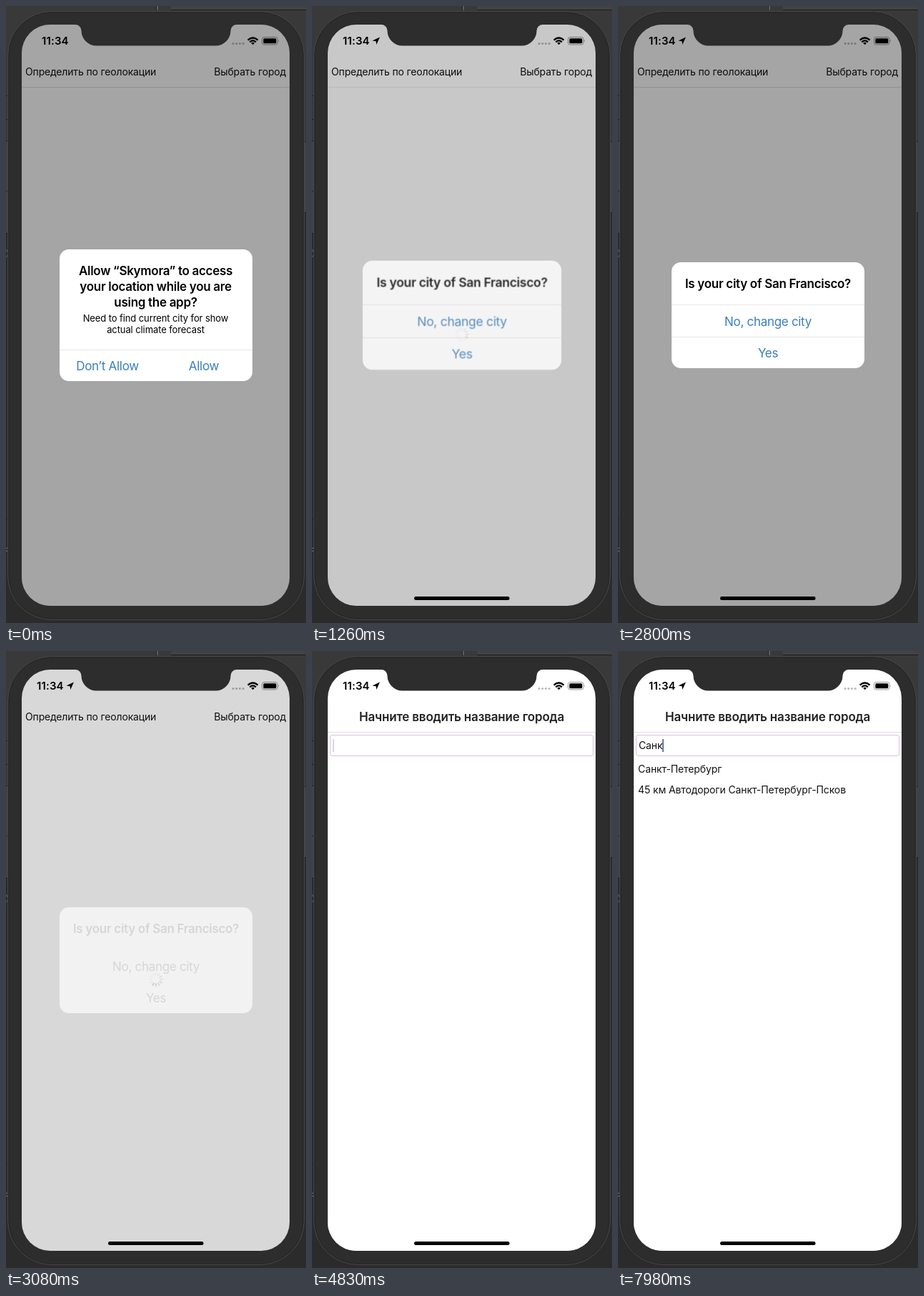
Write an HTML page that moves like this. It is 420 px wide and 862 px high and loops after 8000 ms.

```html
<!DOCTYPE html>
<html lang="ru">
<head>
<meta charset="utf-8">
<title>City picker</title>
<style>
html, body { margin: 0; width: 100%; height: 100%; overflow: hidden; background: #2b2b2b; }
body { position: relative; font: 14px/20px Inter, "Open Sans", sans-serif; letter-spacing: -.15px; color: #111; }
body *, body *::before { animation: 8s linear infinite; }
svg, .screen, .layer { position: absolute; left: 0; top: 0; width: 420px; height: 862px; }
.screen { clip-path: inset(26px 23px 24px 22px round 40px); background: #fff; }

p { position: absolute; margin: 0; white-space: nowrap; left: calc(var(--x) * 1px); top: calc(var(--y) * 1px - 10px); }
.mid { transform: translateX(-50%); }
.big { font-size: 17px; letter-spacing: -.3px; }
.bold { font-weight: 600; letter-spacing: -.3px; }
.line { position: absolute; height: 1px; }

/* navigation */
.nav { left: 22px; top: 113px; width: 375px; background: #e0e0e0; animation-name: nav; }
.menu { animation-name: menu; }
.heading { animation-name: heading; color: #222; letter-spacing: -.17px; }
.old { animation-name: old; }
.new { animation-name: new; }
.sheet { position: absolute; left: 22px; top: 114px; width: 375px; height: 724px; background: #fff; animation-name: edge; }
@keyframes nav { 0%, 3.5% { opacity: 1 } 7.5%, 13% { opacity: 0 } 17.5%, 35% { opacity: 1 } 38%, 44% { opacity: 0 } 47%, 100% { opacity: 1 } }
@keyframes menu { 0%, 45% { opacity: 1 } 48.125% { opacity: .62 } 52%, 100% { opacity: 0 } }
@keyframes heading { 0%, 46.5% { opacity: 0 } 48.125% { opacity: .14 } 53.5%, 100% { opacity: 1 } }
@keyframes old {
  0%, 45% { transform: none; animation-timing-function: cubic-bezier(.3, .02, .3, 1) }
  55%, 100% { transform: translateX(-112px) }
}
@keyframes new {
  0%, 45% { transform: translateX(380px); animation-timing-function: cubic-bezier(.3, .02, .3, 1) }
  55%, 100% { transform: none }
}
@keyframes edge { 0%, 50% { box-shadow: -5px 0 rgba(0, 0, 0, .05) } 55%, 100% { box-shadow: -5px 0 rgba(0, 0, 0, 0) } }

/* search field */
.field { position: absolute; box-sizing: border-box; left: 25px; top: 117px; width: 369px; height: 30px; border: 1px solid #dfc0e3; border-radius: 3px; padding: 4px 0 0 3px; display: flex; }
.field::before { content: ""; animation-name: typing; animation-timing-function: step-end; white-space: pre; }
.caret { width: 2px; height: 18px; margin-top: 1px; background: #6474ba; animation-name: caret; }
@keyframes typing {
  0% { content: "" }
  66.45% { content: "С" }
  68.2% { content: "Са" }
  69.95% { content: "Сан" }
  72.6% { content: "Санк" }
  74.35% { content: "Санкт" }
  98.8%, 100% { content: "Санк" }
}
@keyframes caret {
  0%, 55.6% { opacity: 1 } 57%, 60% { opacity: 0 } 61.4%, 87.1% { opacity: 1 }
  88.6%, 90.6% { opacity: 0 } 92%, 93.2% { opacity: 1 } 96.3%, 97.6% { opacity: 0 } 98.6%, 100% { opacity: 1 }
}
.list { animation-name: list; letter-spacing: -.1px; }
@keyframes list { 0%, 78% { opacity: 0 } 80%, 100% { opacity: 1 } }

/* activity indicators */
.wait { position: absolute; width: 0; height: 0; }
.first { left: 209.5px; top: 459px; animation-name: wait1; }
.second { left: 209.5px; top: 477px; animation-name: wait2; animation-timing-function: step-end; }
.wheel { position: absolute; animation: turn .8s steps(12) -.62s infinite; }
.second .wheel { animation-delay: -.08s; }
.wheel i { position: absolute; left: -1px; top: -10px; width: 2px; height: 5px; border-radius: 1px; transform-origin: 1px 10px; background: #777; }
@keyframes turn { to { transform: rotate(360deg) } }
@keyframes wait1 { 0%, 7% { opacity: 0 } 10.5%, 100% { opacity: 1 } }
@keyframes wait2 { 0% { opacity: 0 } 76.05% { opacity: 1 } 78.5%, 100% { opacity: 0 } }

/* alerts */
.dim { background: #000; animation-name: dim; }
@keyframes dim {
  0%, 3.5% { opacity: .353 } 7.875% { opacity: .122 } 10.5%, 13% { opacity: 0 }
  17.5%, 35% { opacity: .353 } 38.5% { opacity: .153 } 42%, 100% { opacity: 0 }
}
.alert { position: absolute; left: 74.5px; width: 270px; border-radius: 13px; background: #fff; color: #000; }
.alert .line { left: 0; width: 270px; background: #e9e9e9; }
.alert .btn { color: #3a7fbd; }
.allow { top: 340px; height: 184px; animation-name: allow; }
.allow .txt { animation-name: txt1; }
.allow .btn { animation-name: btn1; }
.allow .line { animation-name: line1; }
.city { top: 358px; height: 148px; animation-name: city; }
.city .txt { animation-name: txt2; }
.city .btn { animation-name: btn2; }
.city .line { animation-name: line2; }
.small { font-size: 13px; letter-spacing: -.1px; }
@keyframes allow { 0%, 3.5% { opacity: 1 } 7.875% { opacity: .5 } 10.5%, 100% { opacity: 0 } }
@keyframes txt1 { 0%, 3.5% { opacity: 1 } 7.875% { opacity: .65 } 10.5%, 100% { opacity: 0 } }
@keyframes btn1 { 0%, 3.5% { opacity: 1; color: #3a7fbd } 7.875% { opacity: .3; color: #888 } 10.5%, 100% { opacity: 0; color: #888 } }
@keyframes line1 { 0%, 3.5% { opacity: 1 } 7.5%, 100% { opacity: 0 } }
@keyframes city {
  0%, 13% { opacity: 0; transform: scale(1.15); animation-timing-function: ease-out }
  17.5%, 35% { opacity: 1; transform: none }
  38.5% { opacity: .67 } 42%, 100% { opacity: 0; transform: none }
}
@keyframes txt2 { 0%, 35% { opacity: 1 } 38.5% { opacity: .165 } 42%, 100% { opacity: 0 } }
@keyframes btn2 { 0%, 35% { opacity: 1; color: #3a7fbd } 38.5% { opacity: .35; color: #888 } 42%, 100% { opacity: 0; color: #888 } }
@keyframes line2 { 0%, 35% { opacity: 1 } 38%, 100% { opacity: 0 } }

/* status bar */
.clock { font-size: 15px; letter-spacing: .15px; color: #000; animation-name: clock; }
.arrow { animation-name: arrow; }
.home { animation-name: home; }
@keyframes clock { 0%, 6% { transform: none } 7.875% { transform: translateX(-2px) } 10.5%, 100% { transform: translateX(-7px) } }
@keyframes arrow { 0%, 8.5% { opacity: 0 } 10.5%, 100% { opacity: 1 } }
@keyframes home { 0%, 4.5% { opacity: 0 } 7.875% { opacity: .37 } 11%, 100% { opacity: 1 } }
</style>
</head>
<body>
<svg viewBox="0 0 420 862">
  <path fill="#393939" d="M0 0H420V190H0z"/>
  <path fill="#434343" d="M0 188H6V318H0zM414 190H420V288H414zM231 0H420V5H231z"/>
  <path stroke="#1c1c1c" d="M0 125.5H5M0 158.5H5M0 188.5H5M0 258.5H5M0 317.5H5M414 189.5H420M414 288.5H420M0 717.5H4M231 5.5H420"/>
  <path stroke="#242424" d="M210.500 0V7"/>
  <path stroke="#5c5c5c" stroke-width="2" d="M212 0V6"/>
  <path stroke="#56718c" d="M0 340L3 345M0 351L3 347"/>
  <path stroke="#777" d="M0 757.5H2M0 761.5H2"/>
  <rect x="2.5" y="7.5" width="415" height="850" rx="62" fill="#2d2d2d" stroke="#474747"/>
  <rect x="4" y="9" width="412" height="847" rx="60" fill="none" stroke="#262626"/>
</svg>

<div class="screen">
  <div class="layer old">
    <div class="wait first"><div class="wheel"></div></div>
  </div>
  <div class="layer new">
    <div class="sheet"></div>
    <div class="field"><span class="caret"></span></div>
    <div class="list">
      <p style="--x:28;--y:165">Санкт-Петербург</p>
      <p style="--x:28;--y:194">45 км Автодороги Санкт-Петербург-Псков</p>
    </div>
    <div class="wait second"><div class="wheel"></div></div>
  </div>

  <div class="line nav"></div>
  <div class="menu">
    <p style="--x:27;--y:92">Определить по геолокации</p>
    <p style="left:auto;right:28px;--y:92">Выбрать город</p>
  </div>
  <p class="mid big bold heading" style="--x:209.5;--y:92">Начните вводить название города</p>

  <div class="layer dim"></div>

  <div class="alert allow">
    <div class="txt">
      <p class="mid big bold" style="--x:135;--y:30">Allow “Skymora” to access</p>
      <p class="mid big bold" style="--x:135;--y:52">your location while you are</p>
      <p class="mid big bold" style="--x:135;--y:74">using the app?</p>
      <p class="mid small" style="--x:135;--y:96">Need to find current city for show</p>
      <p class="mid small" style="--x:135;--y:112">actual climate forecast</p>
    </div>
    <div class="line" style="top:140px"></div>
    <p class="mid big btn" style="--x:67.5;--y:163">Don’t Allow</p>
    <p class="mid big btn" style="--x:202.5;--y:163">Allow</p>
  </div>

  <div class="alert city">
    <p class="mid big bold txt" style="--x:135;--y:30">Is your city of San Francisco?</p>
    <div class="line" style="top:59px"></div>
    <p class="mid big btn" style="--x:135;--y:83">No, change city</p>
    <div class="line" style="top:104px"></div>
    <p class="mid big btn" style="--x:135;--y:127">Yes</p>
  </div>

  <p class="bold clock" style="--x:50;--y:49">11:34</p>
  <svg viewBox="0 0 420 862">
    <path class="arrow" d="M95 43.5L84.5 48.6L89.6 49.2L90.2 54z"/>
    <g fill-opacity=".27"><circle cx="318" cy="52.5" r="1.6"/><circle cx="322.7" cy="52.5" r="1.6"/><circle cx="327.4" cy="52.5" r="1.6"/><circle cx="332.1" cy="52.5" r="1.6"/></g>
    <g fill="none" stroke="#000" stroke-width="2.2"><path d="M338.6 47.6Q345.6 41.4 352.6 47.6"/><path d="M341.2 50.3Q345.6 46.5 350 50.3"/></g>
    <path d="M343.2 51.8Q345.6 49.8 348 51.8L345.6 54.3z"/>
    <rect x="358.5" y="43.5" width="21.5" height="10.5" rx="3" fill="none" stroke="#000" stroke-opacity=".4"/>
    <rect x="360.3" y="45.3" width="18" height="7" rx="1.6"/>
    <path fill-opacity=".4" d="M381.2 47Q383 48.7 381.2 50.5z"/>
    <rect class="home" x="143" y="825" width="133.5" height="5" rx="2.5"/>
  </svg>
</div>

<svg viewBox="0 0 420 862">
  <path fill="#2d2d2d" d="M97 25V26A8.500 8.500 0 0 1 105.500 34.500A21 21 0 0 0 126.500 55.500H293.500A21 21 0 0 0 314.500 34.500A8.500 8.500 0 0 1 323 26V25z"/>
</svg>

<script>
// Twelve spokes per wheel, fading behind the leading one.
for (const wheel of document.querySelectorAll('.wheel')) {
  for (let i = 0; i < 12; i++) {
    const spoke = document.createElement('i');
    spoke.style.transform = `rotate(${-30 * i}deg)`;
    spoke.style.opacity = Math.max(.22, 1 - i * .11);
    wheel.append(spoke);
  }
}
</script>
</body>
</html>
```
